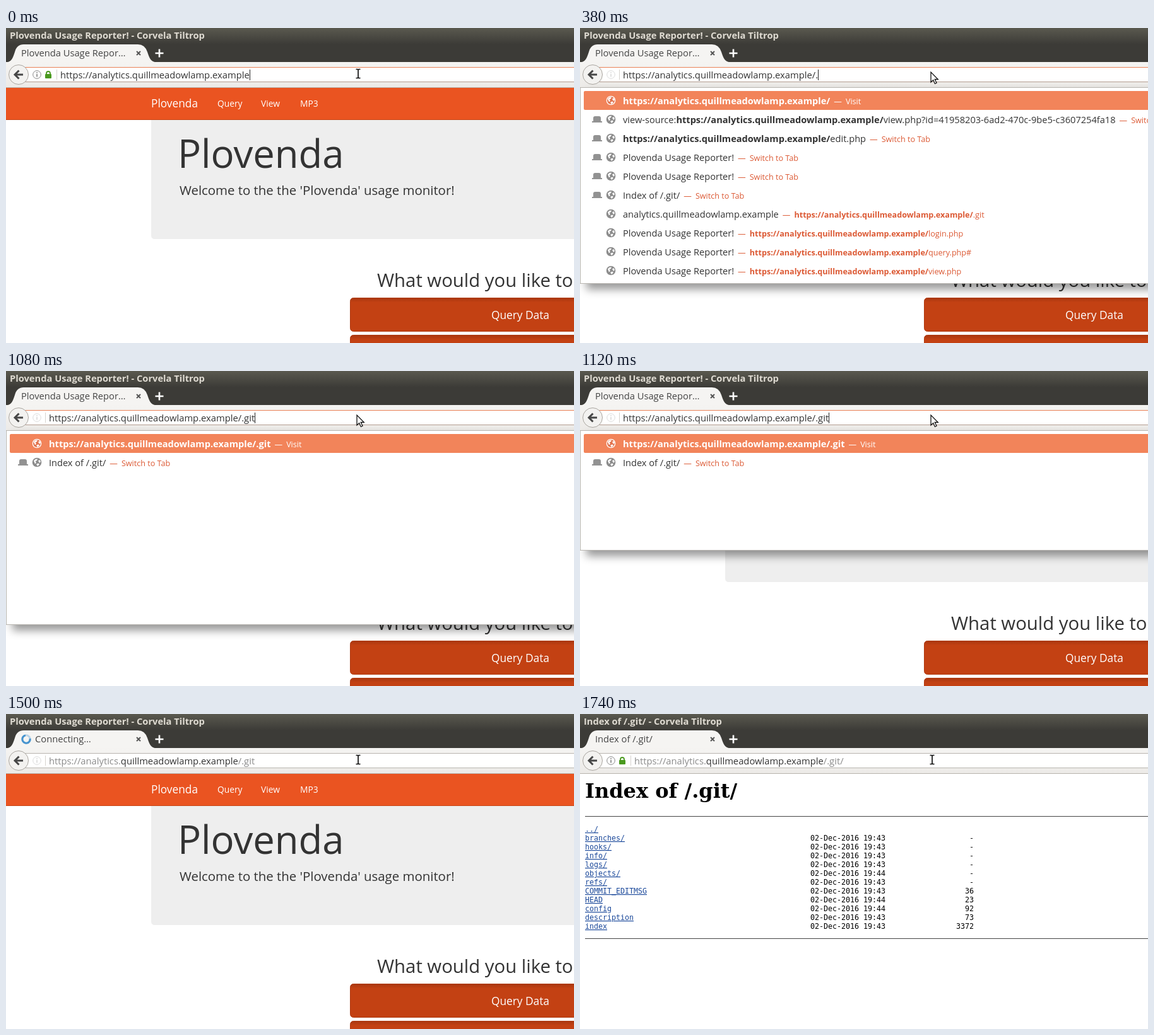
An HTML page that plays this animation: 900x500 px, repeating every 4870 ms.

```html
<!DOCTYPE html>
<html lang="en">
<head>
<meta charset="utf-8">
<style>
html, body { margin: 0; width: 100%; height: 100%; overflow: hidden; background: #fff; }
svg { display: block; }
text { font-family: "Open Sans", "Noto Sans", sans-serif; font-weight: 450; white-space: pre; }
.mono { font-family: "DejaVu Sans Mono", monospace; font-weight: 400; }
.serif { font-family: "DejaVu Serif", serif; }
.b { font-weight: 650; }
.link { text-decoration: underline; }
.popup { filter: drop-shadow(10px 9px 7px #0006); }
</style>
</head>
<body>
<svg id="stage" width="900" height="500" viewBox="0 0 900 500">
  <defs>
    <linearGradient id="bar" x2="0" y2="1"><stop stop-color="#5a594f"/><stop offset="1" stop-color="#3c3b37"/></linearGradient>
    <linearGradient id="tools" x2="0" y2="1"><stop stop-color="#f5f4f2"/><stop offset="1" stop-color="#eceae7"/></linearGradient>
    <linearGradient id="inset" x2="0" y2="1"><stop stop-color="#a83710"/><stop offset=".13" stop-color="#c34113"/></linearGradient>
  </defs>
  <g id="view"></g>
</svg>
<script>
const LOOP = 4870, KEY = 66;
const APP = 'Plovenda', BROWSER = 'Corvela Tiltrop', SUB = 'https://analytics.';
const DOMAIN = 'quillmeadowlamp.example', SITE = SUB + DOMAIN;
const TITLE = APP + ' Usage Reporter!', INDEX = 'Index of /.git/';
const INK = '#333', ORANGE = '#dc5a35', SMALL = 12.6;
const view = document.getElementById('view');

const text = (x, y, size, body, fill = INK, more = '') =>
  `<text x="${x}" y="${y}" font-size="${size}" fill="${fill}" ${more}>${body}</text>`;
const span = (body, more = '') => `<tspan ${more}>${body}</tspan>`;
const bold = body => span(body, 'class="b"');
const rect = (x, y, w, h, fill, more = '') =>
  `<rect x="${x}" y="${y}" width="${w}" height="${h}" fill="${fill}" ${more}/>`;
const path = (d, more) => `<path d="${d}" ${more}/>`;
const line = (d, color, width = 1, more = '') =>
  path(d, `fill="none" stroke="${color}" stroke-width="${width}" ${more}`);

// Number of characters of the path typed so far
function typed(t) {
  if (t < 90) return 0;
  if (t < 380) return 1;
  return Math.min(5, 2 + Math.floor((t - 380) / KEY));
}

function popupBottom(t) {
  if (t < 130 || t >= 1380) return 0;
  return t < 1080 ? 405 : t < 1120 ? 402 : t < 1160 ? 284 : 165;
}

function spinner(t) {
  const turn = Math.floor((t - 1420) / 40) * 40;
  return `<g transform="translate(32 40) rotate(${turn})">
    <circle r="6.2" fill="none" stroke="#b9d3e8" stroke-width="3"/>
    ${line('M0-6.2A6.2 6.2 0 1 1-6.2 0', '#4794cf', 3)}</g>`;
}

function chrome(t) {
  const loaded = t >= 1740, busy = t >= 1420 && !loaded, focus = t < 1380;
  const secure = t < 380 || loaded;
  const name = loaded ? INDEX : TITLE;
  const end = '/.git/'.slice(0, loaded ? 6 : typed(t));
  const x = secure ? 86 : 68;
  const address = focus ? SITE + end
    : span(SUB, 'fill="#8b8b8b"') + DOMAIN + span(end, 'fill="#8b8b8b"');
  const tab = busy ? spinner(t) + text(46, 45, 14.7, 'Connecting…', '#444')
    : text(24, 45, 14.7, loaded ? INDEX : TITLE.slice(0, 20) + '…', '#444');
  const lock = secure
    ? rect(62, 73, 10, 7, '#4a9a1f', 'rx="1"') + line('M64 74v-2a3 3 0 0 1 6 0v2', '#4a9a1f', 1.8) : '';
  return rect(0, 0, 900, 26, 'url(#bar)') + rect(0, 26, 900, 28, '#3c3b37')
    + text(6, 17, 14.7, `${name} - ${BROWSER}`, '#dfdbd2', 'class="b"')
    + rect(0, 54, 900, 41, 'url(#tools)') + rect(0, 94, 900, 1, '#b8b3ad')
    + path('M0 54.500C9 54 11 47 14 38Q17 26 28 26H209Q220 26 224 38C227 47 229 54 239 54.500Z', 'fill="#f5f4f2"')
    + tab
    + line('M207 37l6 6m0-6l-6 6', '#555', 2)
    + line('M236.500 40h13m-6.500-6.500v13', '#fff', 2.6)
    + rect(30, 62, 880, 24, '#fff')
    + line('M30 62.500H900', focus ? '#ea8257' : '#b9b5af') + line('M30 85.500H900', focus ? '#b39b90' : '#b9b5af')
    + `<circle cx="20" cy="74" r="15.500" fill="#f3f2f0" stroke="#aaa6a0"/>`
    + line('M27 74H15M20.500 67.500L14 74l6.500 6.500', '#474747', 3)
    + `<g opacity="${secure ? 1 : .3}"><circle cx="49" cy="74" r="6.300" fill="none" stroke="#888"/>
       ${rect(48.3, 70, 1.5, 1.7, '#777')}${rect(48.3, 73, 1.5, 4.5, '#777')}</g>`
    + lock + line(`M${x - 5.5} 66v16`, '#d5d2ce')
    + text(x, 80, 14.75, address, INK, 'id="address"')
    + (focus ? rect(0, 66, 1, 17, '#222', 'id="caret"') : '');
}

function home() {
  const button = y => rect(545.5, y + .5, 380, 53, 'url(#inset)', 'rx="5" stroke="#b03a11"');
  return rect(0, 95, 900, 51, '#ea5421') + rect(0, 145, 900, 1, '#c64516')
    + text(230, 126, 17.3, APP, '#fff')
    + ['Query', 'View', 'MP3'].map((s, i) => text([335, 404, 466][i], 125, 13.8, s, '#fff')).join('')
    + path('M230 146H900V335H236Q230 335 230 329Z', 'fill="#eee"')
    + text(272, 222, 61.5, APP)
    + text(275, 265, 20.4, `Welcome to the the '${APP}' usage monitor!`)
    + text(588, 411, 29.3, 'What would you like to do?')
    + button(428) + button(487) + text(769, 462, 17.3, 'Query Data', '#fff');
}

function listing() {
  const rows = ['../', 'branches/', 'hooks/', 'info/', 'logs/', 'objects/*', 'refs/',
    'COMMIT_EDITMSG 36', 'HEAD* 23', 'config* 92', 'description 73', 'index 3372'];
  const cell = (x, y, s, fill, more) => text(x, y, 11.63, s, fill, more);
  return text(8, 133, 32, INDEX, '#000', 'class="serif b"')
    + rect(8, 162, 892, 1, '#444') + rect(8, 356, 892, 1, '#444')
    + rows.map((row, i) => {
      const [file, size = '-'] = row.split(' '), y = 187 + 14 * i;
      const minute = file.endsWith('*') ? 44 : 43;   // a star marks the later minute
      return cell(8, y, file.replace('*', ''), '#1d4a9b', 'class="mono link"')
        + (i ? cell(365, y, '02-Dec-2016 19:' + minute, '#000', 'class="mono"')
          + cell(624, y, size, '#000', 'class="mono" text-anchor="end"') : '');
    }).join('');
}

function globe(y, active) {
  return `<g transform="translate(49 ${y})"><circle r="7.300" fill="${active ? '#fff' : '#8c8c8c'}"/>`
    + (active ? '<circle r="6" fill="#e2744f"/>' : '')
    + path('M-5-2.500L-2.500-5 1-5.500 0-3-2.500-1.500-1 .500-3 2.500ZM2-2.500L4.500-4 6-1 4 1ZM-1 3L2 1.500 4 3 1 6Z', 'fill="#fff"')
    + '</g>';
}

const hat = y => path(`M19 ${y + 5}v-2h2v-5q0-3 3-3h6q3 0 3 3v5h2v2Z`, 'fill="#929292"');

function results(t) {
  const note = (body, fill = ORANGE) =>
    span('—', `dx="6" font-size="${SMALL}" fill="${fill}"`)
    + span(body, `dx="6" font-size="${SMALL}" fill="${fill}"`);
  const site = bold(SITE + '/'), go = note('Switch to Tab');
  const visit = SITE + '/.git'.slice(0, Math.max(1, typed(t - KEY)));
  const index = [INDEX + go, 1];
  const rows = [
    [bold(visit) + note('Visit', '#fff'), 0],
    t < 710 ? ['view-source:' + site + 'view.php?id=41958203-6ad2-470c-9be5-c3607254fa18' + go, 1] : index
  ];
  if (t < 1080) rows.push(
    [site + 'edit.php' + go, 1],
    t < 230 ? [TITLE + note(SITE), 0] : [TITLE + go, 1],
    [TITLE + go, 1],
    index,
    ['analytics.' + DOMAIN + note(site + '.git'), 0],
    ...['login.php', 'query.php#', 'view.php'].map(s => [TITLE + note(site + s), 0])
  );
  return rows.map(([body, open], i) => {
    const y = 115 + 30 * i;
    return globe(y, !i) + (open ? hat(y) : '') + text(68, y + 6, 14.6, body, i ? INK : '#fff');
  }).join('');
}

function popup(t) {
  const bottom = popupBottom(t);
  if (!bottom) return '';
  return rect(.5, 94.5, 960, bottom - 94, '#fff', 'class="popup" stroke="#b9b6b1"')
    + rect(6, 100, 900, 30, '#f2845a', 'rx="2"') + results(t);
}

function pointer(t) {
  if (t >= 130 && t < 1340)
    return path('M556 70v16l3.700-3.500 2.700 6 2.600-1.200-2.700-5.800h5Z', 'fill="#fff" stroke="#111" stroke-width="1.300"');
  const beam = 'M554.500 65.500h2.500l1 1 1-1h2.500M558 66v13M554.500 79.500h2.500l1-1 1 1h2.500';
  return line(beam, '#fff', 3.6) + line(beam, '#111', 1.7);
}

function placeCaret() {
  const caret = document.getElementById('caret'), address = document.getElementById('address');
  if (caret) caret.setAttribute('x', Math.round(+address.getAttribute('x') + address.getComputedTextLength()));
}

const start = performance.now();
let shown = '';
function draw() {
  const t = (performance.now() - start) % LOOP;
  const markup = (t < 1740 ? home() : listing()) + chrome(t) + popup(t) + pointer(t);
  if (markup !== shown) {
    view.innerHTML = shown = markup;
    placeCaret();
  }
  requestAnimationFrame(draw);
}
draw();
</script>
</body>
</html>
```
